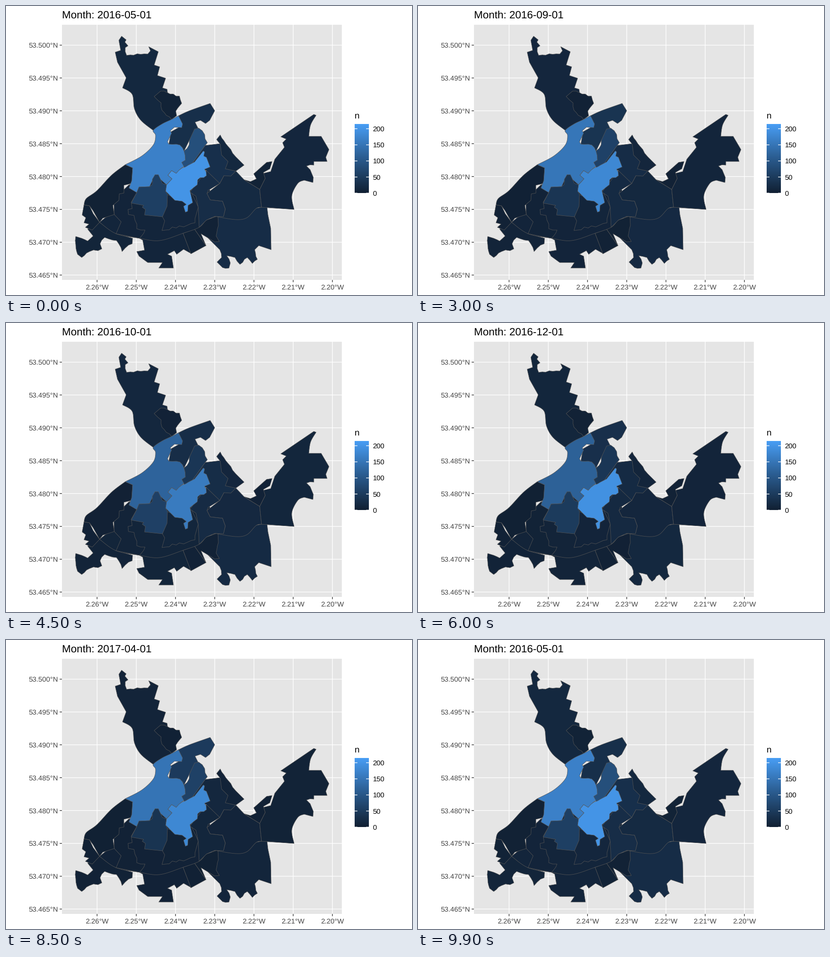
These frames come from a looping animation (885x632 px, 10 s). A matplotlib script:

```python
import matplotlib.pyplot as plt
import numpy as np
from matplotlib.animation import FuncAnimation
from matplotlib.colors import LinearSegmentedColormap
from matplotlib.patches import Polygon, Rectangle

W, H, DPI = 885, 632, 128
PT = 72 / DPI
FRAMES, STEP = 100, 100
TOP = 215

plt.rcParams["font.family"] = "Liberation Sans"
plt.rcParams["text.hinting"] = "none"
rng = np.random.default_rng(7)

fig = plt.figure(figsize=(W / DPI, H / DPI), dpi=DPI, facecolor="white")
ax = fig.add_axes([0, 0, 1, 1])
ax.axis("off")
blues = LinearSegmentedColormap.from_list(
    "blues", ["#112033", "#2a5b8e", "#489df4"], N=512)


def label(x, y, s, px, color="black", ha="left"):
    return ax.text(x, y, s, fontsize=px * PT, color=color, ha=ha, va="baseline")


def stroke(xs, ys, color, z=1):
    ax.plot(xs, ys, color=color, lw=1.4 * PT, zorder=z,
            solid_capstyle="butt", snap=False)


# Panel, grid and axis labels
L, R, T, B = 122, 732, 41, 599
ax.add_patch(Rectangle((L, T), R - L, B - T, fc="#e5e5e5", lw=0, zorder=0))
for i in range(7):
    x = 198.5 + 85.5 * i
    stroke([x, x], [T, B], "white")
    stroke([x, x], [B, B + 5], "#333333")
    label(x, 619.5, f"{2.26 - 0.01 * i:.2f}°W", 15.4, "#444444", "center")
for i in range(8):
    y = 85.6 + 71.83 * i
    stroke([L, R], [y, y], "white")
    stroke([L - 5, L], [y, y], "#333333")
    label(113.3, y + 5.6, f"{53.5 - 0.005 * i:.3f}°N", 15.4, "#444444", "right")

# Colour bar
X0, X1, Y0, Y1 = 760, 791, 258, 409
ax.imshow(np.linspace(1, 0, Y1 - Y0)[:, None], cmap=blues, aspect="auto",
          extent=(X0, X1, Y1, Y0), interpolation="nearest", zorder=2)
ax.set(xlim=(0, W), ylim=(H, 0))
label(760, 246.5, "n", 19.2)
for v in range(0, 201, 50):
    y = 409.2 - 0.704 * v
    stroke([X0, X0 + 6], [y, y], "white", 3)
    stroke([X1 - 6, X1], [y, y], "white", 3)
    label(799.7, y + 5.4, str(v), 15.4)
title = label(122, 26.6, "", 23.1)


def smooth(*pts):
    """Catmull-Rom curve through the points."""
    p = np.array([pts[0], *pts, pts[-1]], float)
    t = np.linspace(0, 1, 9)[:, None]
    out = []
    for a, b, c, d in zip(p, p[1:], p[2:], p[3:]):
        out.extend(b + t * (c - a) / 2 + t**2 * (a - 2.5 * b + 2 * c - d / 2)
                   + t**3 * (1.5 * (b - c) + (d - a) / 2))
    return out


def rough(*pts, amp=2.2, gap=7):
    """Jagged line: random teeth between the points."""
    out = [np.array(pts[0], float)]
    for a, b in zip(np.array(pts, float), np.array(pts[1:], float)):
        d = b - a
        size = np.hypot(*d)
        normal = np.array([-d[1], d[0]]) / size
        n = max(1, int(size / gap))
        out += [a + d * k / n + normal * rng.uniform(-amp, amp)
                for k in range(1, n)] + [b]
    return out


# Counts follow thirteen months that share seven distinct phases
PHASE = [0, 1, 1, 1, 1, 2, 3, 3, 4, 4, 5, 5, 6]
TREND = np.array([1, 0.8, 0.85, 0.85, 0.5, 0.45, 0.7])
wards = []


def ward(outline, counts):
    """Counts are one level on the common trend, or one value per phase."""
    shape = Polygon(outline, closed=True, ec="#555555", lw=0.8 * PT,
                    joinstyle="round", zorder=5 + len(wards))
    ax.add_patch(shape)
    wards.append((shape, counts * TREND if np.isscalar(counts) else counts))


canal = smooth((204, 473), (240, 498), (291, 508), (335, 513), (386, 497),
               (421, 484), (437, 468), (455, 460))
rail = smooth((557, 440), (545, 443), (525, 463), (500, 467), (455, 460))
quay = smooth((376, 240), (361, 248), (340, 258), (321, 272), (326, 283),
              (321, 304), (296, 328), (260, 347))

# South; later wards cover the edges of earlier ones
ward([(204, 473), (240, 498), (276, 508),
      *rough((275, 520), (267, 523), (253, 537), (241, 513), (215, 506),
             (205, 520), (209, 531), (182, 537), (165, 550), (156, 543),
             (152, 522), (152, 504), (165, 508), (178, 514), (190, 503)),
      (178, 488)], 9)
ward([(291, 508), (335, 505), (386, 497), (403, 541), (387, 532), (372, 543),
      (367, 535), (352, 543), (361, 547), (365, 573), (333, 573), (341, 561),
      (309, 561), (290, 547), (285, 537), (302, 534), (298, 512)], 10)
ward([(386, 497), (411, 488), (436, 524), (403, 542)], 5)
ward([(449, 461), (557, 440), (569, 440), (571, 457), (577, 486), (578, 533),
      *rough((551, 524), (542, 533), (548, 554), (537, 563), (526, 550),
             (510, 565), (499, 550), (481, 546), (489, 562), (486, 573),
             (472, 572), (460, 560), (470, 550), (466, 533), amp=1.5),
      (440, 507)], 22)
ward([(411, 488), (437, 468), (462, 459),
      *rough((463, 480), (458, 503), (465, 515)),
      (455, 516), (440, 507), (425, 498), (436, 524)], 4)
ward([*canal, (437, 365), (268, 391), (236, 447)], 10)
ward([(351, 412), (384, 427), (404, 408), (414, 428), (419, 440), (412, 465),
      *rough((412, 474), (378, 481), (340, 491), amp=4),
      (346, 470), (341, 461)], 12)
ward([(268, 391), (285, 408), (273, 429), (275, 443), (266, 445), (267, 456),
      (279, 458), *rough((281, 468), (285, 487), (303, 490), (291, 508)),
      (240, 498), (251, 472), (236, 456), (235, 431), (247, 411)], 8)
ward([*smooth((170, 435), (175, 421), (198, 404), (230, 370), (260, 347)),
      (276, 354), (274, 388), (257, 392), (257, 409), (247, 411), (246, 425),
      (233, 436), (236, 456), (211, 464), (204, 473), (190, 448),
      (182, 437)], 3)
ward([(170, 435), (182, 437), (190, 454), (204, 473), (188, 490), (173, 484),
      (181, 477), (170, 474), (174, 463), (166, 457)], 5)

# East
ward([(466, 388), (475, 371), (501, 361), (519, 380), (553, 401), *rail,
      (474, 460), (478, 444), (472, 427), (445, 424), (438, 410)], 18)
ward([*smooth((676, 239), (664, 260), (660, 285)), (687, 285), (704, 314),
      (697, 331), (700, 340), (671, 340),
      *rough((671, 348), (655, 350), (663, 358), (670, 375), (669, 386)),
      *smooth((650, 381), (636, 388), (623, 415), (628, 445)), (557, 440),
      (553, 401), (565, 377), (561, 366), (577, 362), (586, 335), (607, 309),
      (603, 299), (611, 291), (599, 286), (671, 237)], 12)
ward([(519, 380), (533, 384), (546, 378), (540, 367), (568, 342), (580, 340),
      (575, 356), (561, 364), (565, 377), (553, 401)], 5)
ward([(437, 360), (458, 372), (466, 388), (441, 403), (438, 410), (445, 424),
      (472, 427), (478, 444), (474, 461), (455, 460), (437, 468), (421, 484),
      (419, 440), (414, 416), (401, 407)], 24)
ward([(434, 305), (467, 301), (484, 338), (501, 361), (490, 372), (475, 371),
      (466, 388), (437, 360), (404, 347)], 28)
ward([*rough((467, 282), (484, 307), (494, 322), (501, 330), amp=1.5),
      (519, 348), (501, 361), *rough((478, 356), (484, 340), (470, 326)),
      (467, 302), (459, 292)], 14)

# North
ward([(246, 75), (252, 66), (262, 74), (259, 79), (266, 87),
      *rough((260, 91), (263, 108), (309, 105)), (315, 98), (311, 89),
      (332, 100), (323, 129), (335, 133), (330, 152), (348, 158), (341, 179),
      (351, 182), (361, 248),
      *smooth((321, 272), (294, 250), (280, 225), (275, 193), (254, 179)),
      (262, 157), (243, 123), (238, 101), (250, 97)], 15)
ward(rough((337, 186), (351, 189), (378, 197), (383, 213), (370, 230),
           (372, 240), (361, 248), (340, 228), (338, 212), (323, 198)), 5)
ward([*smooth((376, 240), (400, 229), (445, 213)), (455, 229), (444, 250),
      (435, 257), (424, 250), (412, 254), (419, 268), (400, 293), (388, 317),
      (355, 302), (360, 275), (383, 262)], [27, 36, 28, 20, 37, 48, 32])
ward([*rough((411, 269), (420, 267), (433, 281), (439, 299)), (434, 305),
      (404, 347), *rough((390, 355), (383, 342), (388, 317), (399, 304),
                         (400, 293))], [85, 61, 44, 36, 45, 60, 70])
ward([*quay, (276, 354), (274, 382), (268, 398), (285, 408), (290, 396),
      (313, 395), (325, 369), (350, 391), (362, 378), (353, 370), (361, 360),
      *rough((371, 366), (388, 351), (383, 342), (391, 337), (388, 317),
             (379, 304), (355, 302), amp=1.5),
      (352, 297), (361, 278), (358, 273), (367, 265), (383, 266), (385, 258)],
     [168, 152, 140, 102, 132, 148, 160])
ward([(290, 396), (313, 395), (319, 390), (319, 379), (325, 369), (332, 369),
      (341, 388), (350, 391), (348, 405), (352, 412), (351, 438), (341, 461),
      (302, 457), (304, 445), (297, 440), (300, 436), (273, 431),
      (285, 408)], [57, 38, 72, 46, 52, 36, 45])
ward([(430, 317), (433, 319), (431, 328), (437, 331), (445, 352),
      *rough((433, 357), (437, 371), (418, 380), (417, 391), (401, 404)),
      (407, 430), (397, 436), (396, 449), (391, 451), (387, 438), (393, 434),
      (384, 427), (368, 425), (348, 405), (350, 391), (362, 378), (353, 370),
      (361, 360), *rough((371, 366), (384, 354), (411, 341), amp=1.5)],
     [200, 180, 144, 175, 215, 180, 158])

# Each month holds, then blends to the next
MONTHS = [f"{2016 + (4 + k) // 12}-{(4 + k) % 12 + 1:02d}-01" for k in range(13)]
timeline = []
for k in range(13):
    hold = 3 if k == 12 else 4
    move = 3 if k in (6, 11, 12) else 4
    timeline += [(k, 0.0)] * hold
    timeline += [(k, (j + 1) / move) for j in range(move)]


def draw(i):
    k, p = timeline[i]
    nxt = (k + 1) % 13
    title.set_text("Month: " + MONTHS[nxt if p > 0.5 else k])
    for shape, counts in wards:
        n = (1 - p) * counts[PHASE[k]] + p * counts[PHASE[nxt]]
        shape.set_facecolor(blues(n / TOP))
    return [title] + [shape for shape, _ in wards]


anim = FuncAnimation(fig, draw, frames=FRAMES, interval=STEP,
                     repeat=True, repeat_delay=0, blit=False)
plt.show()
```
